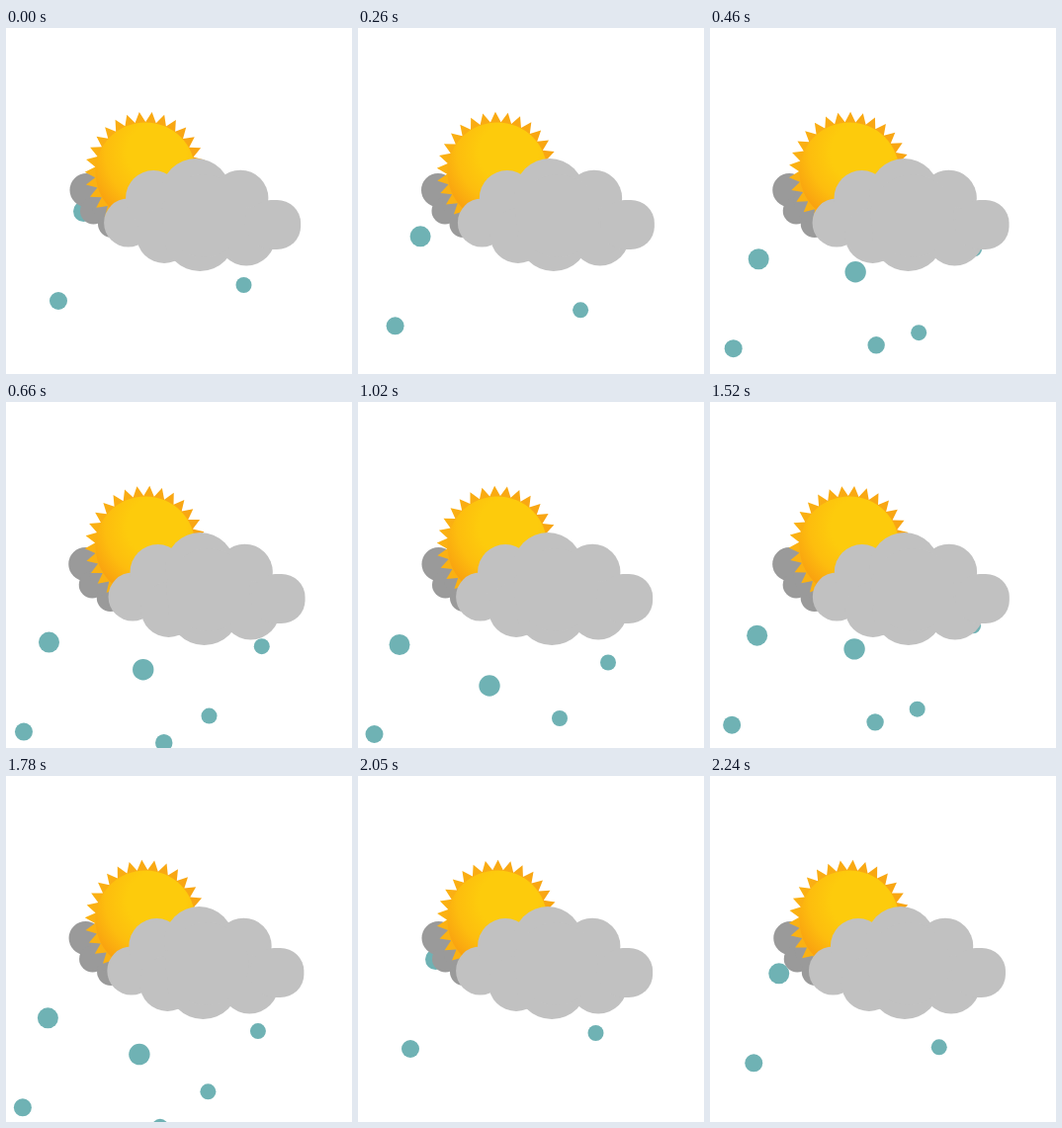
These frames come from a looping animation (350 px wide and 350 px high, 2280 ms). An HTML page:

```html
<!DOCTYPE html>
<html lang="en">
<head>
<meta charset="utf-8">
<title>Sun and rain</title>
<style>
  html, body { margin: 0; width: 100%; height: 100%; overflow: hidden; background: #fff; }
  svg { display: block; width: 100vw; height: 100vh; }
</style>
</head>
<body>
<svg viewBox="0 0 350 350">
  <defs>
    <radialGradient id="face" gradientUnits="userSpaceOnUse" cx="152" cy="126" r="74">
      <stop offset="0.4" stop-color="#fdcb0c"/>
      <stop offset="0.7" stop-color="#fdbd0e"/>
      <stop offset="1" stop-color="#f99f10"/>
    </radialGradient>
    <linearGradient id="flame" gradientUnits="userSpaceOnUse" x1="80" y1="150" x2="200" y2="110">
      <stop offset="0" stop-color="#fbb212"/>
      <stop offset="1" stop-color="#f8a413"/>
    </linearGradient>
  </defs>
  <g id="early" fill="#6fb2b4"></g>
  <g id="late" fill="#6fb2b4"></g>
  <g id="backCloud" fill="#9a9a9a"></g>
  <polygon id="rays" fill="url(#flame)"/>
  <circle cx="141" cy="146" r="50.5" fill="url(#face)"/>
  <g id="frontCloud" fill="#c1c1c1"></g>
</svg>
<script>
  const LOOP = 2280;
  const CYCLE = 1023;
  const SUN = { x: 141, y: 146, teeth: 30, outer: 61.3, inner: 51 };
  const $ = id => document.getElementById(id);

  function addCircles(id, circles) {
    for (const [cx, cy, r] of circles) {
      const dot = document.createElementNS("http://www.w3.org/2000/svg", "circle");
      dot.setAttribute("cx", cx);
      dot.setAttribute("cy", cy);
      dot.setAttribute("r", r);
      $(id).append(dot);
    }
  }

  // Resting places of the drops at the end of each fall
  addCircles("early", [[42, 245.5, 10.5], [16.5, 336, 9], [204, 320, 8]]);
  addCircles("late", [[133, 287, 10.7], [154, 361, 8.7], [253, 263.5, 8]]);
  addCircles("backCloud", [[81.5, 164, 17], [88.5, 185, 13.5], [107, 198, 14], [110, 175, 24]]);
  addCircles("frontCloud", [
    [123.5, 197, 24.5], [149, 172, 28], [192, 167, 35], [237, 172, 28.3],
    [160, 210, 28], [196, 210, 36], [243, 211, 29.5], [200, 190, 42]
  ]);
  $("frontCloud").insertAdjacentHTML("beforeend",
    '<rect x="244" y="174" width="54" height="50" rx="24" ry="23"/>');

  const clamp = v => Math.min(1, Math.max(0, v));

  function bezierEase(x1, y1, x2, y2) {
    const curve = (a, b, s) => 3 * a * s * (1 - s) ** 2 + 3 * b * s * s * (1 - s) + s ** 3;
    return x => {
      let lo = 0, hi = 1;
      for (let i = 0; i < 24; i++) {
        const mid = (lo + hi) / 2;
        if (curve(x1, x2, mid) < x) lo = mid; else hi = mid;
      }
      return curve(y1, y2, (lo + hi) / 2);
    };
  }
  const ease = bezierEase(0.25, 0.1, 0.25, 1);
  const easeInOut = bezierEase(0.42, 0, 0.58, 1);

  const shift = (id, x, y = 0) =>
    $(id).setAttribute("transform", `translate(${x.toFixed(3)} ${y.toFixed(3)})`);

  function rayPoints(turn) {
    const points = [];
    for (let i = 0; i < SUN.teeth * 2; i++) {
      const angle = (turn + i * 180 / SUN.teeth) * Math.PI / 180;
      const radius = i % 2 ? SUN.inner : SUN.outer;
      points.push((SUN.x + radius * Math.sin(angle)).toFixed(2) + "," +
                  (SUN.y - radius * Math.cos(angle)).toFixed(2));
    }
    return points.join(" ");
  }

  function draw(t) {
    const phase = t % CYCLE;

    const earlyLeft = 1 - ease(clamp((phase - 52) / 816));
    shift("early", 36.5 * earlyLeft, -60 * earlyLeft);

    const lateLeft = 1 - easeInOut(clamp((phase - 350) / 540));
    shift("late", 15.5 * lateLeft, -44 * lateLeft);
    $("late").setAttribute("visibility", phase < 350 ? "hidden" : "visible");

    const sway = (1 + Math.cos((phase - 560) / CYCLE * 2 * Math.PI)) / 2;
    shift("frontCloud", 5 * sway);
    shift("backCloud", -1.4 * sway);

    $("rays").setAttribute("points", rayPoints(6.2 + 0.0148 * t));
  }

  const start = performance.now();
  function tick() {
    draw((performance.now() - start) % LOOP);
    requestAnimationFrame(tick);
  }
  draw(0);
  requestAnimationFrame(tick);
</script>
</body>
</html>
```
